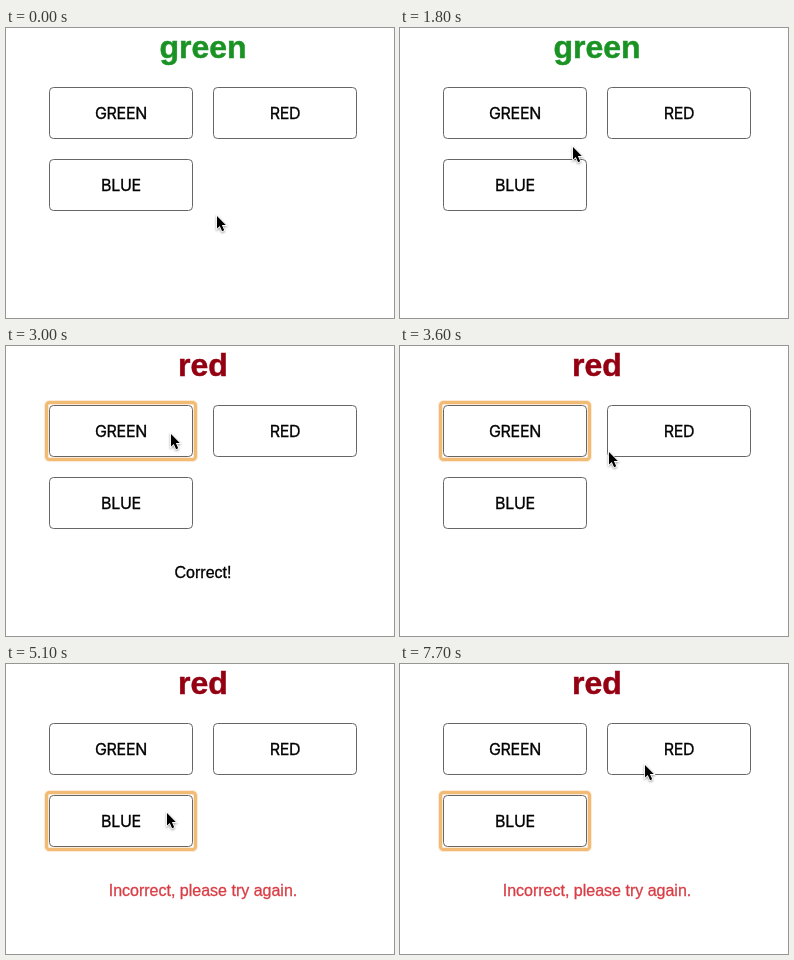
Recreate the animation shown at these times as an HTML page. Size 388 px wide and 290 px high, loop 8 s.

```html
<!DOCTYPE html>
<html lang="en">
<head>
<meta charset="utf-8">
<title>Color quiz</title>
<style>
  html, body { margin: 0; width: 100%; height: 100%; overflow: hidden; background: #fff; }
  svg { display: block; width: 388px; height: 290px; }
  text { text-anchor: middle; font: 16px "Liberation Sans", Arial, sans-serif;
         fill: currentColor; stroke: currentColor; stroke-width: .3px; }
  #word { font-weight: bold; font-size: 32px; stroke-width: .5px; }
  .button rect { fill: #fff; stroke: #666; }
  .button text { font-family: Inter, sans-serif; letter-spacing: -.3px; }
  #ring rect { fill: none; stroke: #f2bb75; }
  #cursor { filter: drop-shadow(0 1px 1px rgba(0, 0, 0, .4)); }
</style>
</head>
<body>
<svg viewBox="0 0 388 290">
  <text id="word" x="197" y="30"></text>
  <g id="ring">
    <rect x="40.5" y="56.5" width="149" height="57" rx="3" stroke-width="5" opacity=".3"/>
    <rect x="40.5" y="56.5" width="149" height="57" rx="3" stroke-width="3"/>
  </g>
  <g id="buttons"></g>
  <text id="message" x="197" y="232"></text>
  <path id="cursor" d="M1 1v12.6l2.8-2.7 2.3 5.3 2.1-.9-2.3-5.2h3.9z"
        stroke="#fff" stroke-width="1.6" paint-order="stroke"/>
</svg>
<script>
const LOOP = 8000, STEP = 100;
const BUTTON_GAP_X = 164, BUTTON_GAP_Y = 72;
const $ = id => document.getElementById(id);

$("buttons").innerHTML = ["GREEN", "RED", "BLUE"].map((label, i) => {
  const x = 43 + i % 2 * BUTTON_GAP_X, y = 59 + Math.floor(i / 2) * BUTTON_GAP_Y;
  return `<g class="button" transform="translate(${x} ${y})">
    <rect x=".5" y=".5" width="143" height="51" rx="4"/><text x="72" y="32">${label}</text></g>`;
}).join("");

const home = { x: 210, y: 187 };
const moves = [
  { from: 200, to: 800, x: 174, y: 204 },
  { from: 800, to: 1400, x: 173, y: 157 },
  { from: 1600, to: 1800, x: 172, y: 118 },
  { from: 1800, to: 1900, x: 158, y: 35 },
  { from: 1900, to: 2000, x: 164, y: 87 },    // over GREEN
  { from: 3100, to: 3800, x: 219, y: 110 },
  { from: 3900, to: 4300, x: 160, y: 148 },   // over BLUE
  { from: 6500, to: 7200, x: 244, y: 100 }    // over RED
];

function cursorAt(t) {
  return moves.reduce((pos, { from, to, x, y }) => {
    const p = Math.min(Math.max((t - from) / (to - from), 0), 1);
    const k = p * p * (3 - 2 * p);
    return { x: pos.x + (x - pos.x) * k, y: pos.y + (y - pos.y) * k };
  }, home);
}

function setText(id, text, color) {
  $(id).textContent = text;
  $(id).style.color = color;
}

function draw(now) {
  const t = Math.floor(now % LOOP / STEP) * STEP;
  const answered = t >= 2400, praised = answered && t < 3400;
  const blueFocused = t >= 5000, failed = t >= 5100;

  if (answered) setText("word", "red", "#940012");
  else setText("word", "green", "#1b9324");

  if (failed) setText("message", "Incorrect, please try again.", "#d93d45");
  else setText("message", praised ? "Correct!" : "", "#000");

  $("ring").style.display = answered ? "" : "none";
  $("ring").setAttribute("transform", `translate(0 ${blueFocused ? BUTTON_GAP_Y : 0})`);

  const { x, y } = cursorAt(t);
  $("cursor").setAttribute("transform", `translate(${Math.round(x)} ${Math.round(y)})`);
}

const start = performance.now();
function tick() {
  draw(performance.now() - start);
  requestAnimationFrame(tick);
}
tick();
</script>
</body>
</html>
```
